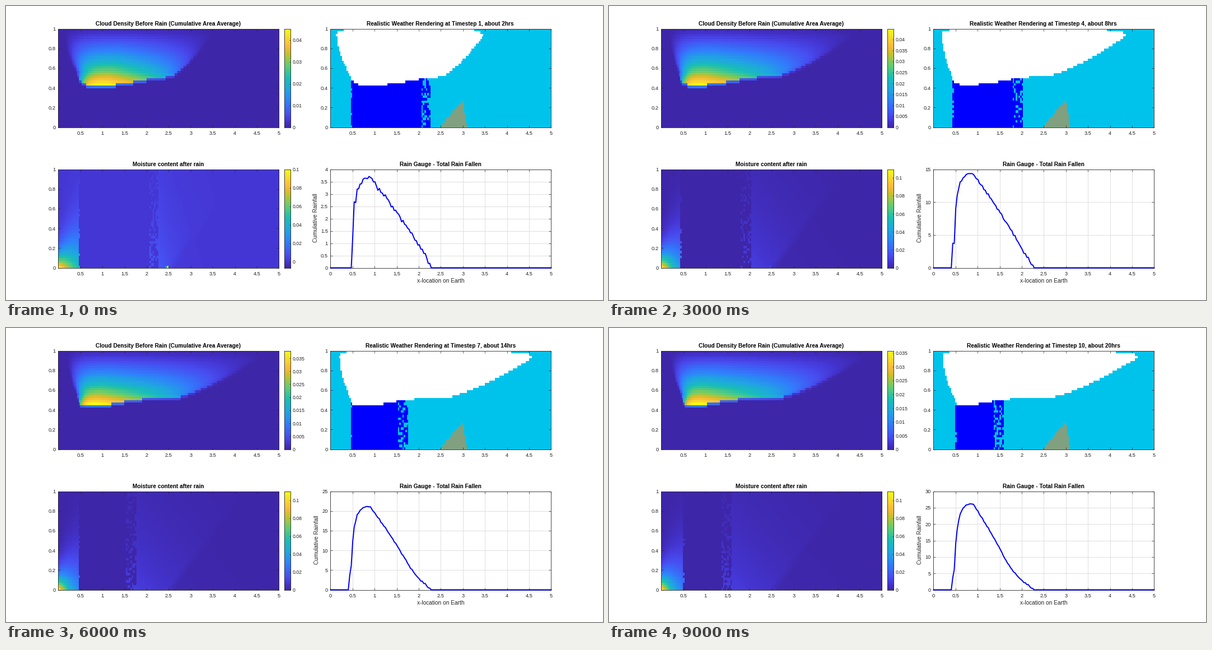
A matplotlib script for the animation above (10000 ms loop, 1066 by 525 pixels).

```python
import numpy as np
import matplotlib.pyplot as plt
from matplotlib.animation import FuncAnimation
from matplotlib.colors import LinearSegmentedColormap, to_rgb

W, H, PT = 1066, 525, 0.72          # stage in pixels, points per pixel
ROWS, COLS, STEPS = 40, 150, 10
INK = "#262626"
plt.rcParams["font.family"] = "Liberation Sans"

PARULA = {0: "#3e26a8", 4: "#4537d5", 8: "#484df0", 16: "#327cfc", 24: "#20a5e3",
          32: "#19bfb6", 40: "#64cd6f", 48: "#d1bf27", 52: "#f8ba3d",
          56: "#fccf30", 60: "#f5e924", 63: "#f9fb15"}
CMAP = LinearSegmentedColormap.from_list(
    "parula", [(k / 63, c) for k, c in PARULA.items()])

x = ((np.arange(COLS) + 0.5) / 30)[None, :]
base = np.arange(ROWS) / ROWS       # lower edge of each row
y = (base + 0.5 / ROWS)[:, None]
MOUNTAIN = (y < .27) & (x > 2.47 + 1.9 * y) & (x < 3.1 - .35 * y)


def youth(step):
    """1 for a new storm, easing to 0 as it settles."""
    return np.exp(-step / 2.1)


def rain_span(step):
    start = np.interp(step, [0, 1, 9], [.47, .41, .495])
    end = np.interp(step, [0, 1, 3, 5, 9], [2.28, 2.39, 2.03, 1.82, 1.59])
    return start, end


def cloud_edges(step):
    start, end = rain_span(step)
    new = youth(step)
    s = np.clip((base - .5) / .42, 0, 1)
    tip_l, tip_r = .22 - .07 * new, 4.65 - 1.18 * new
    left = tip_l + (start - tip_l) * (1 - s) ** 1.7
    right = 2.5 + (tip_r - 2.5) * s ** .72

    # rounded top corners
    left[38:] += [.01, .16]
    right[38:] -= [.07, .5 - .3 * new]

    # the belly hangs over the rain and shrinks row by row
    right[20] = end + .15
    n = np.arange(4)
    left[19:15:-1] = start + .01 + .04 * n ** 2
    right[19:15:-1] = end - [.27, .57, .99, 1.44]
    right[(right - left < .15) | (base < .4)] = 0
    return left, right


def cloud_density(step, left, right, mask):
    row = np.clip(np.arange(ROWS), 22, 36)
    l, r = left[row][:, None], right[row][:, None]
    mid = .85 + .25 * youth(step) + .8 * (y - .45)
    rise = 1 - (1 - np.clip((x - l) / (mid - l), 0, 1)) ** 4
    floor = np.interp(y, [.45, .85], [.35, 0])
    fall = floor + (1 - floor) * np.clip((r - x) / (r - mid), 0, 1) ** .6
    bottom = base[mask.any(axis=1)][0]
    h = (base[:, None] - bottom) / (1 - bottom)
    d = np.where(mask, rise * fall * (1 - h) / (1 + .8 * h), 0)
    above = np.vstack([d[1:], d[:1] * 0])
    d = np.where(d > 0, d, .25 * above)
    return d / d.max()


def rained_cells(step):
    """Cells emptied by rain, ragged at both sides."""
    start, end = rain_span(step)
    noise = np.random.default_rng(40 + step).random((ROWS, COLS))
    gaps = (x > end - .22) & (noise < .34 - .12 * y)
    gaps |= (x < start + 1 / 30) & (noise < .15)
    return (x >= start) & (x <= end) & ~gaps


def moisture(step, rained, high):
    new, end = youth(step), rain_span(step)[1]
    plume = np.exp(-(y / (.13 + .45 * x)) ** 1.2) / (1 + (x / (.23 + .2 * new)) ** 1.3)
    haze = np.exp(-np.clip(x - end, 0, 5) / (1.5 - .95 * new) - y / .75)
    shadow = np.clip(((x - 2.5) * .6 - y) * 8 + .4, 0, 1) * (x > 2.5)
    haze *= (.085 + .015 * new) * (1 - .75 * shadow)
    m = np.where(x < 1, plume, haze) * high
    m[rained] = 0
    m[0, 73:76] += np.array([.03, .09, 0]) * np.exp(-step)   # foot of the mountain
    return m


def weather(mask, rained):
    img = np.empty((ROWS, COLS, 3))
    img[:] = to_rgb("#00c3ec")
    img[MOUNTAIN] = to_rgb("#80a080")
    img[rained & (y < .5)] = to_rgb("#0000ff")
    img[mask] = 1
    return img


GAUGE_X = np.linspace(0, 5, COLS)


def rainfall(step):
    """Rain fallen in one step, in small stairs."""
    start, end = rain_span(step)
    end = min(end, 2.29)
    stair = start + (np.floor((GAUGE_X - start) / .06) + .5) * .06
    rise = 1 - np.exp(-np.clip(stair - start, 0, 5) / .07)
    fall = np.clip((end - stair) / (end - .9), 0, 1) ** .85
    noise = np.random.default_rng(step).uniform(.98, 1.02, COLS)
    return np.interp(step, [0, 1, 4, 9], [3.65, 4.1, 2.45, 1.5]) * rise * fall * noise


TOTALS = np.cumsum([rainfall(k) for k in range(STEPS)], axis=0)

fig = plt.figure(figsize=(W / 100, H / 100), dpi=100, facecolor="white")


def box(left, top, width, height=176):
    # just under half a pixel: lines snap to left and top, data sits on their centres
    left, top = left + .45, top + .55
    ax = fig.add_axes([left / W, 1 - (top + height) / H, width / W, height / H])
    for s in ax.spines.values():
        s.set(color=INK, linewidth=.6, zorder=6)
    return ax


def caption(cx, base_y, text, **kw):
    return fig.text(cx / W, 1 - base_y / H, text, size=10.1 * PT, ha="center",
                    va="baseline", **kw)


def set_ticks(ax, ticks):
    ax.set_yticks(ticks, [f"{round(t, 4):g}" for t in ticks])


def panel(left, top, title, first_tick=.5):
    ax = box(left, top, 394)
    ax.set(xlim=(0, 5), ylim=(0, 1))
    ticks = np.arange(first_tick, 5.1, .5)
    ax.set_xticks(ticks, [f"{t:g}" for t in ticks])
    ax.tick_params(direction="in", top=True, right=True, length=4 * PT, width=.5,
                   color=INK, labelcolor=INK, labelsize=9.4 * PT)
    ax.tick_params(axis="x", pad=6 * PT)
    ax.tick_params(axis="y", pad=4.5 * PT)
    return ax, caption(left + 196.7, top - 4.8, title, weight="bold")


def heat(ax):
    set_ticks(ax, np.arange(0, 1.1, .2))
    return ax.imshow(np.zeros((ROWS, COLS)), extent=(0, 5, 0, 1), origin="lower",
                     aspect="auto", interpolation="nearest", cmap=CMAP)


def color_bar(top):
    ax = box(497, top, 11)
    ax.imshow(np.linspace(0, 1, 256)[:, None], extent=(0, 1, 0, 1), origin="lower",
              aspect="auto", cmap=CMAP, transform=ax.transAxes)
    ax.set_xticks([])
    ax.yaxis.tick_right()
    ax.tick_params(direction="in", length=2.5 * PT, width=.5, color=INK, pad=3.5 * PT,
                   labelcolor=INK, labelsize=8.8 * PT)
    return ax


def scale_bar(ax, low, high, gap):
    set_ticks(ax, np.arange(0, high, gap))
    ax.set_ylim(low, high)


cloud_ax, _ = panel(93, 40, "Cloud Density Before Rain (Cumulative Area Average)")
sky_ax, sky_title = panel(579, 40, "")
moist_ax, _ = panel(93, 291, "Moisture content after rain")
gauge_ax, _ = panel(579, 291, "Rain Gauge - Total Rain Fallen", first_tick=0)
cloud_img, sky_img, moist_img = map(heat, (cloud_ax, sky_ax, moist_ax))
cloud_img.set_clim(0, 1)
cloud_bar, moist_bar = color_bar(40), color_bar(291)
gauge_ax.grid(color="#dfdfdf", linewidth=.72)
gauge_ax.set_axisbelow(True)
gauge_line, = gauge_ax.plot([], [], color="#0000ff", linewidth=2 * PT,
                            clip_on=False, zorder=7)
caption(776, 493.8, "x-location on Earth", color=INK)
gauge_label = fig.text(0, 1 - 378.5 / H, "Cumulative Rainfall", size=10.1 * PT,
                       rotation=90, ha="center", va="center", color=INK)


def draw(step):
    left, right = cloud_edges(step)
    mask = (x >= left[:, None]) & (x <= right[:, None])
    rained = rained_cells(step)

    cloud_img.set_data(cloud_density(step, left, right, mask))
    high = np.interp(step, [0, 1, 3, 5, 6, 9],
                     [.0452, .0521, .0449, .0428, .0379, .0359])
    scale_bar(cloud_bar, 0, high, .01 if high > .045 else .005)

    sky_img.set_data(weather(mask, rained))
    sky_title.set_text(f"Realistic Weather Rendering at Timestep {step + 1}, "
                       f"about {2 * step + 2}hrs")

    low, high = 0 if step else -.0067, .1102 - .01 * np.exp(-step / 1.2)
    moist_img.set_data(moisture(step, rained, high))
    moist_img.set_clim(low, high)
    scale_bar(moist_bar, low, high, .02)

    total = TOTALS[step]
    gauge_line.set_data(GAUGE_X, total)
    gap = (.5, 1, 2, 5)[np.searchsorted((4, 8, 12), total.max())]
    limit = np.ceil(total.max() / gap) * gap
    gauge_ax.set_ylim(0, limit)
    set_ticks(gauge_ax, np.arange(0, limit + gap / 2, gap))
    label_width = 12.8 if gap < 1 else 5.1 if limit < 10 else 10.2
    gauge_label.set_x((565.3 - label_width) / W)
    return ()


anim = FuncAnimation(fig, draw, frames=STEPS, init_func=lambda: (), interval=1000,
                     repeat=True, repeat_delay=0, blit=False)
plt.show()
```
